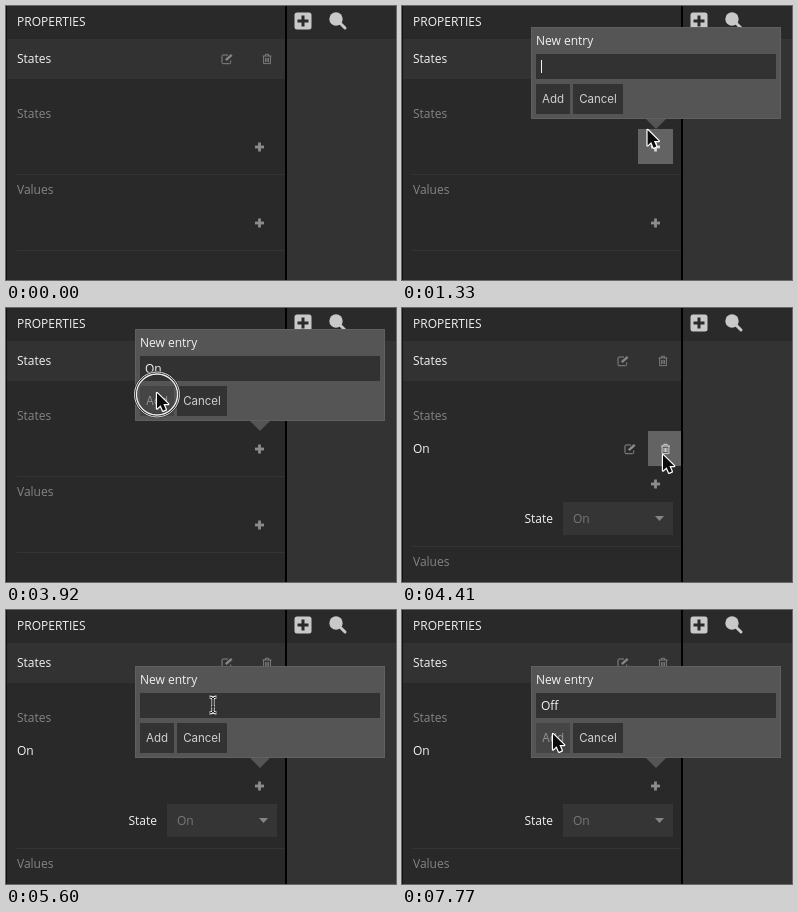
Recreate the animation shown at these times as an HTML page with a canvas. Size 390 by 274 pixels, loop 8000 ms.

```html
<!DOCTYPE html>
<html lang="en">
<head>
<meta charset="utf-8">
<title>States panel</title>
<style>
  html, body { margin: 0; width: 100%; height: 100%; overflow: hidden; background: #292929; }
  canvas { display: block; width: 390px; height: 274px; }
</style>
</head>
<body>
<canvas id="stage"></canvas>
<script>
const W = 390, H = 274, LOOP = 8000, STEP = 70;
const UI_FONT = '12px "Open Sans", "Noto Sans", sans-serif';
const BUTTON_FONT = '11.5px Inter, "Liberation Sans", sans-serif';
const canvas = document.getElementById('stage');
const ctx = canvas.getContext('2d');
const dpr = window.devicePixelRatio || 1;
canvas.width = W * dpr;
canvas.height = H * dpr;

// Pointer moves: start, end, from, to
const moves = [
  [0, 490, [392, 218], [252, 135]],
  [1190, 1750, [252, 135], [211, 64]],
  [3220, 3850, [210, 64], [151, 85]],
  [4130, 4410, [151, 85], [261, 147]],
  [4410, 4760, [261, 147], [250, 171]],
  [5110, 5600, [250, 171], [207, 95]],
  [7210, 7770, [198, 99], [151, 124]],
];
const hiddenSpans = [[0, 70], [2520, 3290], [6510, 7280]];
const clickSpans = [[840, 980], [1750, 1890], [3920, 4060], [4900, 5040], [5740, 5950]];
const keys = [[2520, 'O'], [2800, 'On'], [6510, 'O'], [6790, 'Of'], [7000, 'Off']];

const within = (t, spans) => spans.some(([a, b]) => t >= a && t < b);
const inside = (p, [x, y, w, h]) => p && p.x >= x && p.x < x + w && p.y >= y && p.y < y + h;
const ease = u => u * u * (3 - 2 * u);

function pointerAt(t) {
  if (within(t, hiddenSpans)) return null;
  const [start, end, from, to] = moves.filter(m => t >= m[0]).pop();
  const u = ease(Math.min(1, (t - start) / (end - start)));
  return { x: from[0] + (to[0] - from[0]) * u, y: from[1] + (to[1] - from[1]) * u };
}

function rect(x, y, w, h, color) {
  ctx.fillStyle = color;
  ctx.fillRect(x, y, w, h);
}

function label(text, x, y, color, font = UI_FONT, align = 'left') {
  ctx.font = font;
  ctx.textAlign = align;
  ctx.fillStyle = color;
  ctx.fillText(text, x, y);
}

function shape(points, color) {
  ctx.beginPath();
  points.forEach(([x, y]) => ctx.lineTo(x, y));
  ctx.closePath();
  ctx.fillStyle = color;
  ctx.fill();
}

function strokePath(d, x, y, color, width) {
  ctx.save();
  ctx.translate(x, y);
  ctx.strokeStyle = color;
  ctx.lineWidth = width;
  ctx.stroke(new Path2D(d));
  ctx.restore();
}

function plusIcon(x, y, color) {
  rect(x - 4.5, y - 1.4, 9, 2.8, color);
  rect(x - 1.4, y - 4.5, 2.8, 9, color);
}

function editIcon(x, y, color) {
  strokePath('M1 -4H-4Q-5 -4 -5 -3V3.5Q-5 4.7 -4 4.7H2.5Q3.7 4.7 3.7 3.5V1.5', x, y, color, 1);
  strokePath('M-1.2 1.2L4.7 -4.2', x, y, color, 2.5);
}

function trashIcon(x, y, color) {
  strokePath('M-4.5 -3H4.5M-1.7 -3V-4.7H1.7V-3M-3.4 -3V4.6H3.4V-3M-1.4 -1V3M0 -1V3M1.4 -1V3', x, y, color, 0.9);
}

function iconButton(icon, x, y, box, pointer) {
  const hover = inside(pointer, box);
  if (hover) rect(...box, '#636363');
  icon(x, y, hover ? '#d8d8d8' : '#8c8c8c');
}

function drawToolbar() {
  rect(281, 0, 109, 33, '#2a2a2a');
  rect(281, 33, 109, 241, '#333');
  ctx.fillStyle = '#c9c9c9';
  ctx.beginPath();
  ctx.roundRect(288.5, 6.5, 17, 17, 2.5);
  ctx.fill();
  rect(291.5, 13.5, 11, 3, '#2a2a2a');
  rect(295.5, 9.5, 3, 11, '#2a2a2a');
  ctx.fillStyle = '#c9c9c9';
  ctx.beginPath();
  ctx.arc(330, 13, 6.7, 0, 7);
  ctx.fill();
  ctx.lineCap = 'round';
  strokePath('M4 4L9 9', 330, 13, '#c9c9c9', 3);
  ctx.lineCap = 'butt';
}

function drawPanel(hasEntry, pointer) {
  rect(0, 0, 280, H, '#292929');
  rect(0, 33, 280, 40, '#323232');
  label('PROPERTIES', 11, 20, '#f2f2f2');
  label('States', 11, 57, '#f2f2f2');
  editIcon(221, 53, '#858585');
  trashIcon(261, 53, '#858585');
  label('States', 11, 112, '#858585');
  const line = y => rect(11, y, 268, 1, '#353535');
  if (hasEntry) {
    label('On', 11, 145, '#f2f2f2');
    iconButton(editIcon, 228, 141, [212, 123, 34, 35], pointer);
    iconButton(trashIcon, 263.5, 141, [246, 123, 33, 35], pointer);
    iconButton(plusIcon, 253.5, 176, [236, 158, 35, 35], pointer);
    label('State', 151, 215, '#f2f2f2', UI_FONT, 'right');
    rect(161, 194, 110, 33, '#353535');
    label('On', 171, 215, '#777');
    shape([[253, 208], [262, 208], [257.5, 213]], '#858585');
    line(238);
    label('Values', 11, 258, '#858585');
  } else {
    iconButton(plusIcon, 253.5, 141, [236, 123, 35, 35], pointer);
    line(168);
    label('Values', 11, 188, '#858585');
    plusIcon(253.5, 217, '#8c8c8c');
    line(244);
  }
  rect(0, 0, 1, H, '#111');
  rect(279, 0, 2, H, '#000');
}

function button(text, x, y, w, pointer) {
  const hover = inside(pointer, [x, y, w, 30]);
  rect(x, y, w, 30, hover ? '#454545' : '#333');
  label(text, x + w / 2, y + 19, hover ? '#929292' : '#d0d0d0', BUTTON_FONT, 'center');
}

function drawPopup(t, opened, top, pointer) {
  rect(129, top, 250, 92, '#555');
  ctx.strokeStyle = '#606060';
  ctx.lineWidth = 1;
  ctx.strokeRect(129.5, top + 0.5, 249, 91);
  shape([[244, top + 92], [264, top + 92], [254, top + 102]], '#555');
  label('New entry', 134, top + 18, '#f2f2f2');
  rect(134, top + 27, 240, 25, '#323232');

  const typed = keys.filter(([at]) => at >= opened && at <= t).pop();
  const [since, text] = typed || [opened, ''];
  label(text, 139, top + 44, '#f2f2f2');
  const blinkOn = Math.floor((t - since) / 525) % 2 === 0;
  const pressed = t >= 3920 && t < 4060;
  if (blinkOn && !pressed) rect(139 + ctx.measureText(text).width, top + 33, 1, 13, '#f2f2f2');

  button('Add', 134, top + 57, 34, pointer);
  button('Cancel', 171, top + 57, 50, pointer);
}

function drawRing({ x, y }, radius) {
  const circle = (r, color, width) => {
    ctx.beginPath();
    ctx.arc(x, y, r, 0, 7);
    ctx.strokeStyle = color;
    ctx.lineWidth = width;
    ctx.stroke();
  };
  circle(radius - 1.5, '#222', 4);
  circle(radius - 2.5, '#eee', 1.4);
  circle(radius - 0.5, '#ddd', 1);
}

function drawPointer({ x, y }, isText) {
  ctx.lineJoin = 'round';
  if (isText) {
    const beam = 'M-3.5 -8Q0 -8 0 -5.5V5.5Q0 8 -3.5 8M3.5 -8Q0 -8 0 -5.5V5.5Q0 8 3.5 8M-2 2H2';
    strokePath(beam, x, y, '#eee', 3);
    strokePath(beam, x, y, '#111', 1);
    return;
  }
  const arrow = 'M0 0V15.5L3.6 12.2L6 17.8L8.8 16.6L6.4 11.1H11.2Z';
  strokePath(arrow, x, y, '#fff', 2.4);
  ctx.save();
  ctx.translate(x, y);
  ctx.fillStyle = '#0c0c0c';
  ctx.fill(new Path2D(arrow));
  ctx.restore();
}

function draw(t) {
  ctx.setTransform(dpr, 0, 0, dpr, 0, 0);
  const pointer = pointerAt(t);
  const second = t >= 5040;
  const open = second || (t >= 980 && t < 4060);
  const top = second ? 56 : 21;
  const overPopup = open && inside(pointer, [129, top, 250, 92]);

  drawToolbar();
  drawPanel(t >= 4060, overPopup ? null : pointer);
  if (open) drawPopup(t, second ? 5040 : 980, top, pointer);
  if (!pointer) return;
  const isText = open && inside(pointer, [134, top + 27, 240, 25]);
  if (within(t, clickSpans)) {
    drawRing({ x: pointer.x, y: pointer.y + (isText ? 0 : 1.5) }, isText ? 17.5 : 23);
  }
  drawPointer(pointer, isText);
}

const began = performance.now();
function frame() {
  const t = (performance.now() - began) % LOOP;
  draw(Math.floor(t / STEP) * STEP);
  requestAnimationFrame(frame);
}
frame();
</script>
</body>
</html>
```
